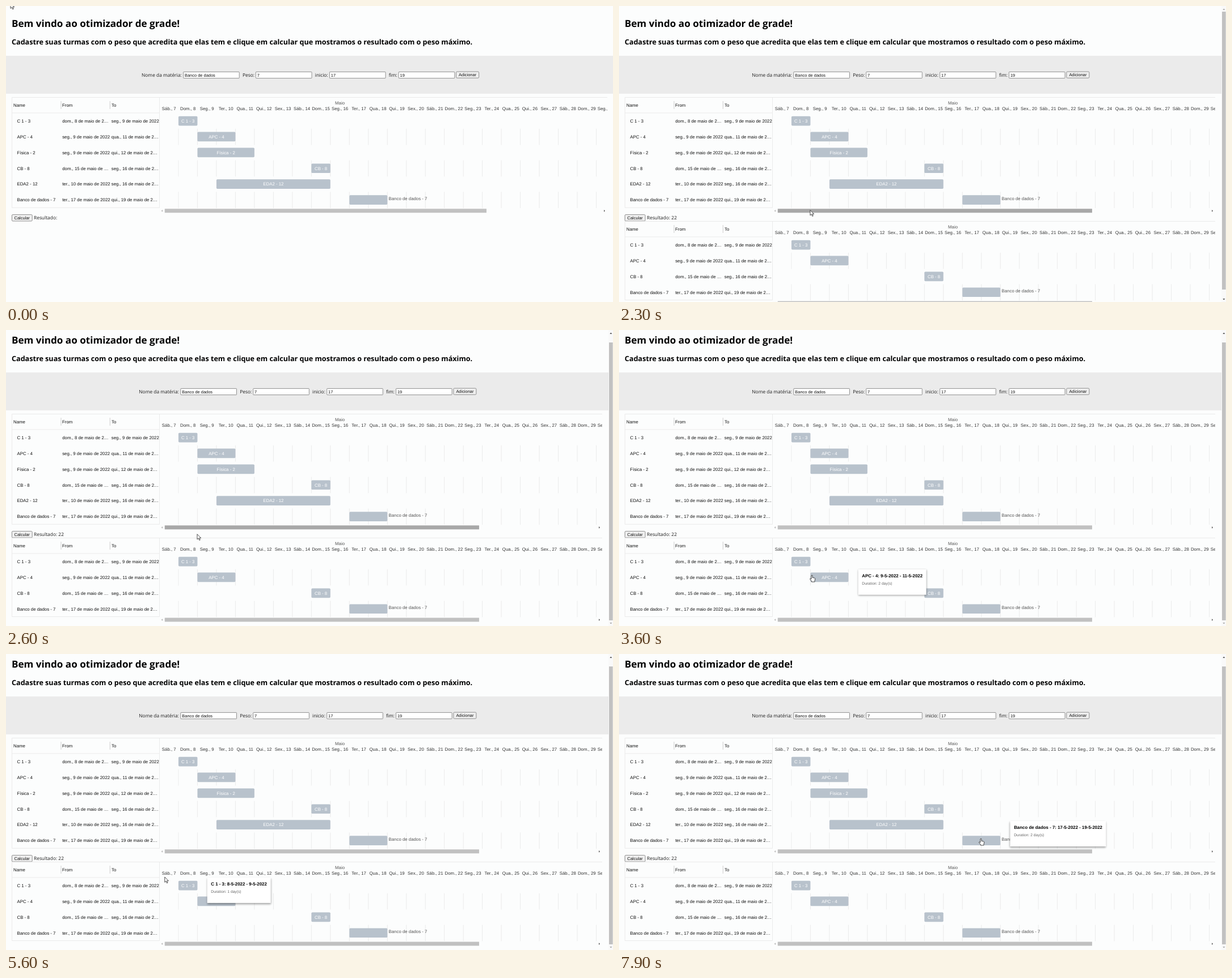
An HTML page for the animation above (8000 ms loop, 1070 by 523 pixels).

```html
<!DOCTYPE html>
<html lang="pt">
<head>
<meta charset="utf-8">
<title>Otimizador de grade</title>
<style>
html, body { margin: 0; width: 100%; height: 100%; overflow: hidden; background: #fcfdfd; }
#stage { position: absolute; left: 0; top: 0; width: 1070px; height: 523px; overflow: hidden; }
svg { position: absolute; left: 0; top: 0; }
text { font: 7.83px "Liberation Sans", Arial, sans-serif; fill: #111; text-rendering: geometricPrecision; }
.ui { font: 8.4px "Open Sans", "Noto Sans", sans-serif; fill: #1c1c1c; }
.h1 { font: 700 17.1px "Open Sans", "Noto Sans", sans-serif; fill: #000; }
.h2 { font: 700 12.6px "Open Sans", "Noto Sans", sans-serif; fill: #000; }
.ctl { font-size: 7.44px; }
.mid { text-anchor: middle; }
.day { fill: #333; }
.soft { fill: #555; }
.inv { fill: #fff; }
.line { stroke: #e6e6e6; stroke-width: .8; fill: none; }
.sep { stroke: #c4c4c4; stroke-width: .8; }
.field { fill: #fff; stroke: #767676; stroke-width: .8; }
.btn { fill: #efefef; stroke: #767676; stroke-width: .8; }
.bar { fill: #b8c2cc; }
.thumb { fill: #c1c1c1; }
.on { fill: #505050; }
.off { fill: #a8a8a8; }
#tip { position: absolute; left: 0; top: 0; height: 44.5px; padding: 0 6.7px; box-sizing: border-box; background: #fff;
  white-space: nowrap; font-family: "Liberation Sans", Arial, sans-serif; text-rendering: geometricPrecision;
  box-shadow: 0 1.7px 3.3px rgba(0,0,0,.16), 0 1.7px 3.3px rgba(0,0,0,.23); }
#tip b { display: block; margin-top: 6.7px; font-size: 7.89px; line-height: 9px; color: #000; }
#tip span { display: block; margin-top: 6.2px; font-size: 6.7px; line-height: 8px; color: #666; }
</style>
</head>
<body>
<div id="stage">
  <svg id="scene" width="1070" height="523"></svg>
  <div id="tip"><b></b><span></span></div>
  <svg width="1070" height="523">
    <g id="arrow"><path d="M0 0V9.3L2.2 7.3L3.8 10.8L5.3 10.1L3.8 6.8H6.7Z" fill="#fff" stroke="#222" stroke-width=".8"/></g>
    <g id="hand"><path d="M-1 .8Q0-.6 1 .8V4.4L4.8 5.2Q6 5.6 5.8 7L5 10V12H-.6V10.6L-3.4 7.2Q-3.6 5.8-2.2 6.2L-1 7.2Z" fill="#fff" stroke="#222" stroke-width=".8"/></g>
    <g id="beam"><path d="M-2-5H-.6L0-4.5L.6-5H2M0-4.5V4.5M-2 5H-.6L0 4.5L.6 5H2" fill="none" stroke="#222" stroke-width=".8"/></g>
  </svg>
</div>
<script>
const $ = id => document.getElementById(id);
const LOOP = 8000, STEP = 100;
const LEFT = 270.5, COL = 33.48, ROW = 27.9, HEAD = 27.4, CONTENT = 1072.8;
const DAYS = ["Sáb.", "Dom.", "Seg.", "Ter.", "Qua.", "Qui.", "Sex."];

// name, first column, last column, start cell, end cell
const TASKS = [
  ["C 1 - 3", 1, 2, "dom., 8 de maio de 2…", "seg., 9 de maio de 2022"],
  ["APC - 4", 2, 4, "seg., 9 de maio de 2022", "qua., 11 de maio de 2…"],
  ["Física - 2", 2, 5, "seg., 9 de maio de 2022", "qui., 12 de maio de 2…"],
  ["CB - 8", 8, 9, "dom., 15 de maio de …", "seg., 16 de maio de 2…"],
  ["EDA2 - 12", 3, 9, "ter., 10 de maio de 2022", "seg., 16 de maio de 2…"],
  ["Banco de dados - 7", 10, 12, "ter., 17 de maio de 2022", "qui., 19 de maio de 2…"]
];
const CHARTS = [
  { top: 161.5, tasks: TASKS },
  { top: 380.5, tasks: [0, 1, 3, 5].map(i => TASKS[i]) }
];

const text = (x, y, s, cls = "") => `<text x="${x}" y="${y}" class="${cls}">${s}</text>`;
const rect = (x, y, w, h, cls, r = 0) => `<rect x="${x}" y="${y}" width="${w}" height="${h}" rx="${r}" class="${cls}"/>`;
const path = (d, cls) => `<path d="${d}" class="${cls}"/>`;
const colX = c => LEFT + c * COL;
const rowY = (chart, i) => chart.top + HEAD + i * ROW;

function chartMarkup(chart, id, right) {
  const { top, tasks } = chart, bottom = rowY(chart, tasks.length), head = top + HEAD;
  let s = path(`M10.5 ${top}H${right}M10.5 ${head}H${LEFT}M10.5 ${bottom}H${LEFT}M10.5 ${top}V${bottom}M${LEFT} ${top}V${bottom}`, "line");
  s += path(`M97 ${top + 6.5}v14M183.3 ${top + 6.5}v14`, "sep");
  [["Name", 13], ["From", 99], ["To", 186]].forEach(([t, x]) => s += text(x, top + 16.5, t));

  let cal = text(588.5, top + 12.6, "Maio", "mid soft");
  for (let c = 0; c < 24; c++) cal += text(colX(c + .5), top + 22.4, `${DAYS[c % 7]}, ${7 + c}`, "mid day");
  for (let i = 1; i < tasks.length; i += 2)
    for (let c = 1; c < 24; c++) cal += path(`M${colX(c)} ${rowY(chart, i)}v${ROW + .8}`, "line");
  s += `<clipPath id="${id}"><rect x="${LEFT}" y="${top}" width="${right - LEFT}" height="220"/></clipPath><g clip-path="url(#${id})">${cal}</g>`;

  tasks.forEach(([name, a, b, from, to], i) => {
    const mid = rowY(chart, i) + ROW / 2 + .2, base = mid + 2.8;
    s += text(19.5, base, name) + text(99.2, base, from) + text(185.8, base, to);
    s += rect(colX(a), mid - 8.37, (b - a) * COL, 16.74, "bar", 1.7);
    s += name.length * 4 < (b - a) * COL
      ? text(colX((a + b) / 2), base, name, "mid inv")
      : text(colX(b) + 2.3, base - 2.8, name, "soft");
  });

  const y = bottom + 2, end = right - 5, view = right - LEFT;
  s += rect(279.8, y, view * (view - 18.8) / CONTENT, 7, "thumb");
  s += path(`M276 ${y + 1.8}v3.6l-2-1.8Z`, "off") + path(`M${end - 1} ${y + 1.8}v3.6l2-1.8Z`, "on");
  return s;
}

function pageMarkup(done) {
  const dx = done ? -4.7 : 0;
  let s = text(10, 36.7, "Bem vindo ao otimizador de grade!", "h1");
  s += text(10, 67.8, "Cadastre suas turmas com o peso que acredita que elas tem e clique em calcular que mostramos o resultado com o peso máximo.", "h2");
  s += `<rect y="88" width="${done ? 1062 : 1070}" height="67" fill="#ebebeb"/><g transform="translate(${dx} 0)">`;
  [["Nome da matéria:", 239, 312.6, "Banco de dados"], ["Peso:", 417, 440.4, "7"],
   ["inicio:", 544.8, 570.4, "17"], ["fim:", 674.8, 692.2, "19"]].forEach(([label, lx, x, value]) => {
    s += text(lx, 124.5, label, "ui") + rect(x, 116.4, 98.6, 11.2, "field", .8) + text(x + 2.4, 124.6, value, "ctl");
  });
  s += rect(793.6, 116, 40, 11.2, "btn", 1.6) + text(813.6, 124.3, "Adicionar", "ctl mid") + "</g>";
  s += rect(10.4, 368.6, 35.8, 11.4, "btn calc", 1.6) + text(28.2, 377, "Calcular", "ctl mid");
  s += text(49, 377, done ? "Resultado: 22" : "Resultado:", "ui");
  const right = done ? 1051 : 1060;
  s += chartMarkup(CHARTS[0], "clip0" + done, right);
  return done ? s + chartMarkup(CHARTS[1], "clip1", right) : s;
}

$("scene").innerHTML = `<g id="before">${pageMarkup(false)}</g><g id="after"><g id="page">${pageMarkup(true)}</g>
  <rect x="1062" width="8" height="523" fill="#f9f9f9"/>
  <rect id="vthumb" x="1063" y="10" width="6.6" height="491" class="thumb"/>
  <path id="up" d="M1064.3 7h4l-2-2.4Z"/><path id="down" d="M1064.3 517h4l-2 2.4Z"/></g>`;
const hThumb = $("page").querySelector(".thumb");
const calcButtons = document.querySelectorAll(".calc");

// pointer waypoints: time, x, y
const ROUTE = [
  [0, 8, -5], [300, 8, -5], [700, 431, 431], [800, 300, 425], [1100, 28.5, 379.5], [1200, 28.5, 379.5],
  [1300, 29, 378.3], [1900, 29, 378.3], [2100, 220, 347.5], [2300, 337, 360.7], [2700, 337, 360.7],
  [3000, 620, 488], [3100, 636, 496], [3300, 405, 473], [3400, 405, 473], [3500, 360, 440],
  [3600, 340, 433], [3800, 340, 433], [3900, 326, 421], [4200, 314, 405], [4300, 314, 405],
  [4600, 549.3, 459.7], [4700, 556, 464], [4900, 613, 481], [5000, 613, 481], [5100, 616, 490],
  [5200, 616, 490], [5500, 322, 408], [5600, 279.8, 394], [6000, 89, 364], [6100, 89, 364],
  [6400, 96, 364], [6500, 96, 364], [6900, 190, 354], [7400, 324, 355], [7700, 552, 298],
  [7800, 552, 298], [7900, 638, 326]
];

function pointer(t) {
  const i = ROUTE.findIndex(p => p[0] >= t);
  if (i <= 0) return ROUTE[i < 0 ? ROUTE.length - 1 : 0].slice(1);
  const [t0, x0, y0] = ROUTE[i - 1], [t1, x1, y1] = ROUTE[i], k = (t - t0) / (t1 - t0);
  return [x0 + (x1 - x0) * k, y0 + (y1 - y0) * k];
}

const scrollAt = t => t < 2500 ? 0 : t < 2600 ? 7 : 13;

function hit(t) {
  if (t < 1700) return null;
  const [x, py] = pointer(t), y = py + scrollAt(t);
  for (const chart of CHARTS)
    for (let i = 0; i < chart.tasks.length; i++) {
      const task = chart.tasks[i], top = rowY(chart, i) + 5.6;
      if (x >= colX(task[1]) && x <= colX(task[2]) && y >= top && y <= top + 17) return { chart, i, task };
    }
  return null;
}

function showTip(h, scroll) {
  $("tip").style.display = h ? "block" : "none";
  if (!h) return;
  const [name, a, b] = h.task;
  const y = Math.min(rowY(h.chart, h.i), rowY(h.chart, h.chart.tasks.length) - 48.3) - scroll;
  $("tip").children[0].textContent = `${name}: ${7 + a}-5-2022 - ${7 + b}-5-2022`;
  $("tip").children[1].textContent = `Duration: ${b - a} day(s)`;
  $("tip").style.transform = `translate(${colX(b) + 17.2}px, ${y}px)`;
}

function render(ms) {
  const t = Math.floor(ms % LOOP / STEP) * STEP;
  const done = t >= 1700, scroll = scrollAt(t), [x, y] = pointer(t), over = hit(t);
  $("before").style.display = done ? "none" : "";
  $("after").style.display = done ? "" : "none";
  $("page").setAttribute("transform", `translate(0 ${-scroll})`);
  $("vthumb").setAttribute("y", 10 + scroll * 12 / 13);
  $("up").setAttribute("class", scroll ? "on" : "off");
  $("down").setAttribute("class", scroll < 13 ? "on" : "off");
  hThumb.style.fill = t >= 2300 && t < 2800 ? "#a8a8a8" : "";
  const fill = t === 1600 ? "#f5f5f5" : t >= 1100 && t < 2000 ? "#e5e5e5" : "";
  calcButtons.forEach(b => b.style.fill = fill);

  // the tooltip lingers one step after the pointer leaves a bar
  showTip(over || hit(t - STEP), scroll);
  const kind = over ? "hand" : t >= 6000 && t < 6600 ? "beam" : "arrow";
  for (const id of ["arrow", "hand", "beam"]) {
    $(id).style.display = id === kind ? "" : "none";
    $(id).setAttribute("transform", `translate(${x} ${y})`);
  }
}

const start = performance.now();
function tick() {
  render(performance.now() - start);
  requestAnimationFrame(tick);
}
tick();
</script>
</body>
</html>
```
